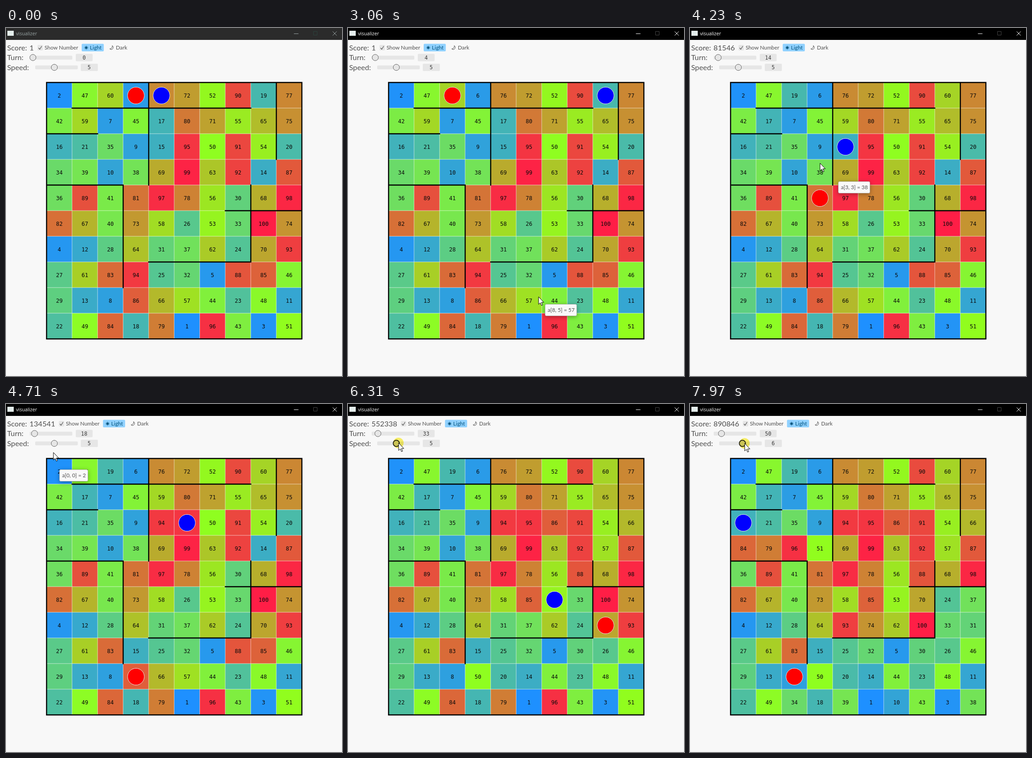
An HTML page that plays this animation: 737 by 760 pixels, repeating every 8 s.

```html
<!DOCTYPE html>
<html lang="en">
<head>
<meta charset="utf-8">
<title>visualizer</title>
<style>
  html, body { margin: 0; width: 100%; height: 100%; overflow: hidden; background: #f8f8f8; }
  svg { display: block; width: 737px; height: 760px; }
  text { font: 11.8px Lato, "Open Sans", sans-serif; fill: #505050; white-space: pre; }
  .big { font-size: 16.2px; }
  .mono { font: 11.5px "DejaVu Sans Mono", monospace; text-anchor: middle; fill: #3c3c3c; }
  .cell { font-size: 12.1px; fill: #0a0a0a; }
  .gray { fill: #e6e6e6; }
  .knob { fill: #e6e6e6; stroke: #646464; }
  .hover { fill: #dcdcdc; stroke: #282828; stroke-width: 1.6; }
  .press { fill: #cdcdcd; stroke: #1e1e1e; stroke-width: 1.8; }
  .grid rect { stroke: #fff; stroke-opacity: .45; }
  .bar { fill: #000; --ink: #fff; --dim: #444; }
  .bar.idle { fill: #2b2b2b; --ink: #9aa5a5; --dim: #2a423c; }
  .bar text { font: 10.6px "Open Sans", "Noto Sans", sans-serif; fill: var(--ink); }
  .bar path { fill: none; stroke: var(--ink); }
  .bar .max { stroke: var(--dim); }
  #tip rect { fill: #f9f9f9; stroke: #bebebe; filter: drop-shadow(0 2px 5px #0005); }
  #halo { fill: #fdf46a; mix-blend-mode: multiply; }
</style>
</head>
<body>
<svg viewBox="0 0 737 760">
  <rect width="737" height="760" fill="#f8f8f8"/>
  <g id="bar" class="bar">
    <rect width="737" height="26"/>
    <rect x="3" y="6" width="14" height="11" fill="#e4eeec"/>
    <text x="22" y="16">visualizer</text>
    <path d="M631.500 12.500h10M716.500 7.500l9 9m0-9l-9 9"/>
    <path class="max" d="M674.500 7.500h8v8h-8z"/>
  </g>

  <text class="big" x="2.500" y="48.500">Score:</text>
  <text class="big" id="score" x="51.500" y="48.500"></text>
  <g id="options">
    <rect class="gray" x="69" y="37" width="12" height="12" rx="2"/>
    <path d="M71.500 43.500l2.500 3 4.500-7" fill="none" stroke="#505050" stroke-width="1.200"/>
    <text x="84.500" y="47">Show Number</text>
    <rect x="166" y="34.500" width="48.500" height="16.500" rx="2" fill="#90d1ff"/>
    <g transform="translate(176 43)" stroke="#00537d" fill="#00537d">
      <circle r="2.100"/>
      <path d="M0-4.500V4.500M-4.500 0H4.500M-3.200-3.200L3.200 3.200M-3.200 3.200L3.200-3.200" stroke-width=".8"/>
    </g>
    <text x="184" y="47" style="fill:#00537d">Light</text>
    <path d="M233 38.500A4.500 4.500 0 1 1 227.500 45.500A5.500 5.500 0 0 0 233 38.500Z" fill="none" stroke="#505050"/>
    <text x="241" y="47">Dark</text>
  </g>

  <text class="big" x="2.500" y="70">Turn:</text>
  <rect class="gray" x="52" y="60.500" width="93.500" height="8.500" rx="2"/>
  <circle class="knob" id="turnKnob" cy="64.500" r="6.800"/>
  <rect class="gray" x="153" y="56.500" width="37" height="16" rx="2"/>
  <text class="mono" id="turn" x="171.500" y="68.500"></text>

  <text class="big" x="2.500" y="91.500">Speed:</text>
  <rect class="gray" x="64" y="81.800" width="93.500" height="8.500" rx="2"/>
  <circle class="knob" id="speedKnob" cy="86" r="6.800"/>
  <rect class="gray" x="164" y="78" width="37.500" height="16" rx="2"/>
  <text class="mono" id="speed" x="182.500" y="90"></text>

  <g id="grid" class="grid"></g>
  <path id="walls" fill="none" stroke="#000" stroke-width="2.400" stroke-linecap="square"/>
  <circle id="red" r="18.300" fill="#f00" stroke="#e4e4e4"/>
  <circle id="blue" r="18.300" fill="#00f" stroke="#e4e4e4"/>

  <g id="tip"><rect x=".5" y=".5" height="25" rx="2.500"/><text x="6" y="17"></text></g>
  <circle id="halo" r="11.500"/>
  <path id="cursor" d="M0 0V16.500L3.800 13 6.300 19 8.800 18 6.300 12.200H11.500Z" fill="#fff" stroke="#000"/>
</svg>
<script>
const $ = id => document.getElementById(id);
const LOOP = 8000, N = 10, SIZE = 56, LEFT = 89, TOP = 119;

const START = [
  2, 47, 60, 6, 76, 72, 52, 90, 19, 77,
  42, 59, 7, 45, 17, 80, 71, 55, 65, 75,
  16, 21, 35, 9, 15, 95, 50, 91, 54, 20,
  34, 39, 10, 38, 69, 99, 63, 92, 14, 87,
  36, 89, 41, 81, 97, 78, 56, 30, 68, 98,
  82, 67, 40, 73, 58, 26, 53, 33, 100, 74,
  4, 12, 28, 64, 31, 37, 62, 24, 70, 93,
  27, 61, 83, 94, 25, 32, 5, 88, 85, 46,
  29, 13, 8, 86, 66, 57, 44, 23, 48, 11,
  22, 49, 84, 18, 79, 1, 96, 43, 3, 51];

// Walls as x1, y1, x2, y2 in cell units
const WALLS = [[4, 0, 4, 4], [9, 0, 9, 3], [3, 4, 3, 8], [8, 4, 8, 7], [1, 1, 8, 1],
  [0, 2, 2, 2], [0, 4, 3, 4], [7, 5, 10, 5], [4, 7, 8, 7]];

const RED = 'L...LLDR.R' + 'RDDDDDDD.R' + '....R.RRUR' + '..U.UR.DDD' + 'D.LLLLLLLU';
const BLUE = 'RRRRDLLLLD' + '.......RRR' + 'RDRUDLLD.L' + 'LDRRDLLLLU' + 'UUL..L.L.U';
const SWAPS = new Set([5, 10, 18, 20, 25, 27, 30, 33, 35, 36, 38, 39, 43, 46, 48, 50]);
const STEP = { U: -N, D: N, L: -1, R: 1, '.': 0 };

const TURNS = [[0, 0], [2529, 0], [2530, 1], [2730, 2], [3060, 4], [3200, 5], [3740, 10],
  [4710, 18], [6310, 33], [7210, 43], [7350, 44], [7970, 50], [8000, 50]];
const MOUSE = [[390, 696, 725], [459, 696, 725], [460, 693, 722], [2700, 693, 722],
  [3000, 418, 587], [3200, 418, 587], [3680, 333, 416], [3740, 322, 410], [4020, 377, 380],
  [4650, 103, 127], [4710, 104, 106], [4850, 110, 86], [6310, 111, 85], [6420, 111, 85],
  [6700, 119, 86], [8000, 120, 86]];

// Piecewise linear track: rows of [time, ...values]
function track(rows, t) {
  if (t <= rows[0][0]) return rows[0].slice(1);
  const i = rows.findIndex(r => r[0] > t);
  if (i < 0) return rows[rows.length - 1].slice(1);
  const a = rows[i - 1], b = rows[i], k = (t - a[0]) / (b[0] - a[0]);
  return a.slice(1).map((v, j) => v + (b[j + 1] - v) * k);
}

const blocked = (x, y, vertical) => WALLS.some(([x1, y1, x2, y2]) => vertical
  ? x1 === x2 && x1 === x && y1 <= y && y < y2
  : y1 === y2 && y1 === y && x1 <= x && x < x2);

function roughness(board) {
  let sum = 0;
  board.forEach((v, i) => {
    const c = i % N, r = (i - c) / N;
    if (c < N - 1 && !blocked(c + 1, r, true)) sum += (v - board[i + 1]) ** 2;
    if (r < N - 1 && !blocked(c, r + 1, false)) sum += (v - board[i + N]) ** 2;
  });
  return sum;
}

function simulate() {
  const base = roughness(START), states = [];
  let board = START, red = 3, blue = 4;
  for (let turn = 0; turn <= RED.length; turn++) {
    if (turn) {
      if (SWAPS.has(turn)) {
        board = board.slice();
        [board[red], board[blue]] = [board[blue], board[red]];
      }
      red += STEP[RED[turn - 1]];
      blue += STEP[BLUE[turn - 1]];
    }
    const score = Math.max(1, Math.round(1e6 * Math.log2(base / roughness(board))));
    states.push({ board, red, blue, score });
  }
  return states;
}

function color(v) {
  const stops = [[30, 144, 255], [144, 255, 30], [255, 30, 70]];
  const x = (v - 1) / 99 * 2, i = x < 1 ? 0 : 1;
  return `rgb(${stops[i].map((a, j) => Math.round(a + (stops[i + 1][j] - a) * (x - i)))})`;
}

function add(parent, tag, attrs) {
  const el = document.createElementNS('http://www.w3.org/2000/svg', tag);
  for (const key in attrs) el.setAttribute(key, attrs[key]);
  return parent.appendChild(el);
}

const cellX = i => LEFT + i % N * SIZE;
const cellY = i => TOP + Math.floor(i / N) * SIZE;
const moveTo = (el, x, y) => el.setAttribute('transform', `translate(${x} ${y})`);
const show = (el, on) => { el.style.display = on ? '' : 'none'; };

const states = simulate();
const cells = START.map((_, i) => ({
  box: add($('grid'), 'rect', { x: cellX(i), y: cellY(i), width: SIZE, height: SIZE })
}));
cells.forEach((cell, i) => {
  cell.label = add($('grid'), 'text', { class: 'mono cell', x: cellX(i) + 28, y: cellY(i) + 33.2 });
});
$('walls').setAttribute('d', `M${LEFT} ${TOP}h560v560h-560z` + WALLS.map(([a, b, c, d]) =>
  `M${LEFT + a * SIZE} ${TOP + b * SIZE}L${LEFT + c * SIZE} ${TOP + d * SIZE}`).join(''));

let shown = -1;
function drawTurn(turn) {
  if (turn === shown) return;
  shown = turn;
  const { board, red, blue, score } = states[turn];
  cells.forEach(({ box, label }, i) => {
    box.setAttribute('fill', color(board[i]));
    label.textContent = board[i];
  });
  moveTo($('red'), cellX(red) + 28, cellY(red) + 28.5);
  moveTo($('blue'), cellX(blue) + 28, cellY(blue) + 28.5);
  $('score').textContent = score;
  moveTo($('options'), 9.35 * (String(score).length - 1), 0);
  $('turn').textContent = turn;
  $('turnKnob').setAttribute('cx', 59 + turn * 0.2);
}

function drawTip(t, board) {
  const [x, y] = track(MOUSE, t - 60);
  const c = Math.floor((x - LEFT) / SIZE), r = Math.floor((y - TOP) / SIZE);
  const inside = t > 460 && c >= 0 && c < N && r >= 0 && r < N;
  show($('tip'), inside);
  if (!inside) return;
  const value = board[r * N + c], [box, label] = $('tip').children;
  label.textContent = `a[${r}, ${c}] = ${value}`;
  box.setAttribute('width', 55 + 7 * String(value).length);
  moveTo($('tip'), Math.round(x + 14), Math.round(y + 16));
}

function draw(t) {
  const turn = Math.floor(track(TURNS, t)[0] + 1e-6);
  drawTurn(turn);
  drawTip(t, states[turn].board);

  const [x, y] = track(MOUSE, t);
  show($('cursor'), t >= 390);
  moveTo($('cursor'), x, y);

  const pressed = (t >= 800 && t < 930) || (t >= 6240 && t < 6900) || t >= 7900;
  show($('halo'), pressed);
  moveTo($('halo'), x - 0.5, y);

  const fast = t >= 6550;
  $('speed').textContent = fast ? 6 : 5;
  $('speedKnob').setAttribute('cx', fast ? 115 : 106);
  $('speedKnob').setAttribute('class', t < 4850 ? 'knob' : pressed ? 'press' : 'hover');
  $('bar').classList.toggle('idle', t < 800);
}

function frame() {
  draw(performance.now() % LOOP);
  requestAnimationFrame(frame);
}
frame();
</script>
</body>
</html>
```
